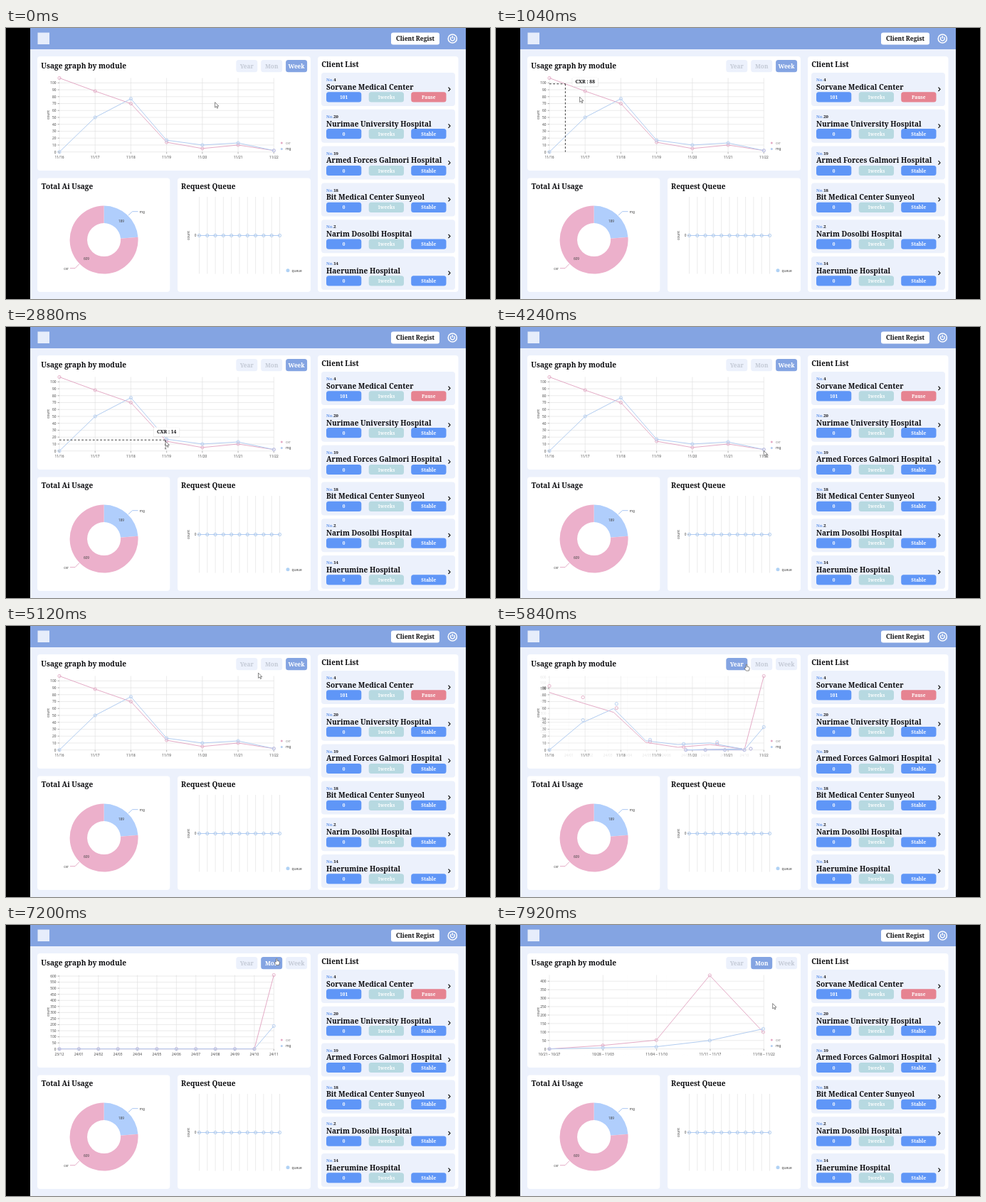
An HTML page that plays this animation: 680 by 382 pixels, repeating every 8 s.

```html
<!DOCTYPE html>
<html lang="en">
<head>
<meta charset="utf-8">
<title>Usage dashboard</title>
<style>
  html, body { margin: 0; width: 100%; height: 100%; overflow: hidden; background: #000; }
  svg { display: block; width: 680px; height: 382px; }
  text { font: 4.8px "Noto Sans", "Open Sans", sans-serif; fill: #444; }
  .b { font-family: "Noto Serif", serif; font-weight: 700; fill: #0c0c0f; }
  .m { text-anchor: middle; }
  .e { text-anchor: end; }
</style>
</head>
<body>
<svg id="stage" viewBox="0 0 680 382" xmlns="http://www.w3.org/2000/svg">
  <g id="page"></g>
  <g id="buttons"></g>
  <g id="chart"></g>
  <g id="pointer"></g>
</svg>
<script>
const LOOP = 8000;
const BLUE = '#84a4e2', PALE = '#ecf1fc';
const SERIES = { cxr: '#e4abc6', mg: '#b1ccf0' };
const PLOT = { x0: 75, x1: 376.3, y0: 70.5, y1: 174.7 };
const $ = id => document.getElementById(id);

// ---- markup helpers
const rect = (x, y, w, h, fill, r = 0, extra = '') =>
  `<rect x="${x}" y="${y}" width="${w}" height="${h}" rx="${r}" fill="${fill}" ${extra}/>`;
const line = (x1, y1, x2, y2, color, w = 0.6, extra = '') =>
  `<path d="M${x1} ${y1}L${x2} ${y2}" fill="none" stroke="${color}" stroke-width="${w}" ${extra}/>`;
const path = (d, color, w, extra = '') =>
  `<path d="${d}" fill="none" stroke="${color}" stroke-width="${w}" ${extra}/>`;
const ring = (x, y, color) =>
  `<circle cx="${x}" cy="${y}" r="2.1" fill="none" stroke="${color}" stroke-width=".9"/>`;
const dot = (x, y, r, color) => `<circle cx="${x}" cy="${y}" r="${r}" fill="${color}"/>`;
const label = (x, y, s, cls = '', extra = '') => `<text x="${x}" y="${y}" class="${cls}" ${extra}>${s}</text>`;
const bold = (x, y, s, size, fill = '#0c0c0f', cls = '') =>
  label(x, y, s, 'b ' + cls, `style="font-size:${size}px;fill:${fill}"`);
const upright = (x, y, s) => label(x, y, s, 'm', `transform="rotate(-90 ${x} ${y})"`);

// ---- static page
const CLIENTS = [
  [4, 'Sorvane Medical Center', 101, 'Pause'],
  [20, 'Nurimae University Hospital', 0, 'Stable'],
  [19, 'Armed Forces Galmori Hospital', 0, 'Stable'],
  [18, 'Bit Medical Center Sunyeol', 0, 'Stable'],
  [2, 'Narim Dosolbi Hospital', 0, 'Stable'],
  [14, 'Haerumine Hospital', 0, 'Stable']
];

function clientCard([no, name, count, state], i) {
  const y = 63 + 51.8 * i;
  const pill = (x, s, fill) =>
    rect(x, y + 27.3, 49.3, 14.2, fill, 3.5) + bold(x + 24.6, y + 36.9, s, 6.6, '#fff', 'm');
  return rect(443, y, 188, 47, PALE, 4) +
    `<text x="450" y="${y + 12.2}" class="b" style="font-size:6px"><tspan fill="#5f93ea">No.</tspan>${no}</text>` +
    bold(450, y + 23.7, name, 10.15) +
    pill(450, count, '#5f96f7') + pill(509.7, '1weeks', '#b7d9e1') +
    pill(569.2, state, state === 'Pause' ? '#e68391' : '#5f96f7') +
    path(`M621.5 ${y + 20.6}l2.5 2.7l-2.5 2.7`, '#111', 1.2);
}

function donut(cx, cy) {
  const end = 189 / 798 * 2 * Math.PI;
  const at = (r, a) => `${cx + r * Math.sin(a)} ${cy - r * Math.cos(a)}`;
  const slice = (a, b, fill) => {
    const big = b - a > Math.PI ? 1 : 0;
    return `<path fill="${fill}" d="M${at(48, a)}A48 48 0 ${big} 1 ${at(48, b)}` +
      `L${at(23.5, b)}A23.5 23.5 0 ${big} 0 ${at(23.5, a)}Z"/>`;
  };
  return slice(0, end, '#b0cefc') + slice(end, 2 * Math.PI, '#ecb0cb') +
    label(162, 274.2, 189, 'm') + label(113, 327, 609, 'm') +
    path('M172 264L177.5 258.7H185.5', '#a9c6f2', 1) + label(187.5, 260.7, 'mg') +
    path('M103 332.5L97 338.7H90', '#e4abc6', 1) + label(88, 340.7, 'cxr', 'e');
}

function queueChart() {
  const xs = Array.from({ length: 11 }, (_, i) => 271.5 + i * 11.3);
  return xs.map(x => line(x, 238, x, 346.5, '#ddd')).join('') +
    line(269, 292.5, 271.5, 292.5, '#777') +
    line(271.5, 292.5, 384.5, 292.5, '#b1ccf3', 1.1) +
    xs.map(x => ring(x, 292.5, '#a9c8ee')).join('') +
    label(267.5, 294.2, 0, 'e') + upright(257.5, 292.5, 'count') +
    dot(396, 341.7, 2.5, '#b0d2f5') + label(401.5, 343.6, 'queue');
}

$('page').innerHTML =
  rect(34, 0, 612, 382, PALE) + rect(34, 0, 612, 30, BLUE) +
  rect(44.5, 6.5, 16.5, 16.5, '#e6edfb') +
  rect(541, 6.5, 68, 17, '#fff', 3) + bold(575, 18.1, 'Client Regist', 8.5, '#0c0c0f', 'm') +
  `<circle cx="627.3" cy="15" r="6.1" fill="none" stroke="#fff" stroke-width="1.5"/>` +
  path('M625.4 12.9a2.9 2.9 0 1 0 3.8 0M627.3 11v3.8', '#fff', 1.4) +
  rect(44, 40, 384, 161, '#fff', 4) + rect(44, 211.5, 186.3, 160.5, '#fff', 4) +
  rect(241, 211.5, 187, 160.5, '#fff', 4) + rect(438, 40, 197.5, 332, '#fff', 4) +
  bold(49.3, 57.4, 'Usage graph by module', 10.2) + bold(49.8, 227.4, 'Total Ai Usage', 10.1) +
  bold(246, 227.2, 'Request Queue', 10.1) + bold(443.3, 55.4, 'Client List', 10.1) +
  CLIENTS.map(clientCard).join('') + donut(137.6, 298.6) + queueChart() +
  upright(60.5, 122.5, 'count') +
  dot(387.3, 162, 1.5, SERIES.cxr) + label(393, 163.9, 'cxr', '', 'style="fill:#888"') +
  dot(387.3, 170.5, 1.5, SERIES.mg) + label(393, 172.4, 'mg');

// ---- usage chart
const zeros = Array(11).fill(0);
const VIEWS = {
  Week: {
    max: 107, step: 10,
    names: [16, 17, 18, 19, 20, 21, 22].map(d => '11/' + d),
    cxr: [107, 88, 70, 14, 5, 10, 2], mg: [0, 50, 77, 17, 10, 13, 2]
  },
  Year: {
    max: 609, step: 50,
    names: ['23/12', ...zeros.map((_, i) => '24/' + String(i + 1).padStart(2, '0'))],
    cxr: [...zeros, 609], mg: [...zeros, 189]
  },
  Mon: {
    max: 436, step: 50,
    names: ['10/21 ~ 10/27', '10/28 ~ 11/03', '11/04 ~ 11/10', '11/11 ~ 11/17', '11/18 ~ 11/22'],
    cxr: [0, 21, 52, 436, 100], mg: [0, 7, 13, 50, 119]
  }
};

for (const v of Object.values(VIEWS)) {
  const px = i => PLOT.x0 + (PLOT.x1 - PLOT.x0) * i / (v.names.length - 1);
  const py = n => PLOT.y1 - (PLOT.y1 - PLOT.y0) * n / v.max;
  v.xTicks = new Map(v.names.map((s, i) => [s, px(i)]));
  v.yTicks = new Map();
  for (let n = 0; n <= v.max; n += v.step) v.yTicks.set(n, py(n));
  v.pts = {};
  for (const s in SERIES) v.pts[s] = v[s].map((n, i) => [px(i), py(n)]);
}

// button click, start of the path spring, start of the spring for everything else
const SWITCHES = [
  { name: 'Week', click: -9e3, lines: -9e3, rest: -9e3 },
  { name: 'Year', click: 5750, lines: 5768, rest: 5787 },
  { name: 'Mon', click: 7190, lines: 7205, rest: 7222 }
];

const lerp = (a, b, p) => a + (b - a) * p;
const clamp = p => Math.max(0, Math.min(1, p));

// Underdamped spring: tension 120, friction 14
function spring(ms) {
  if (ms <= 0) return 0;
  const t = ms / 1000, w = Math.sqrt(71);
  return 1 - Math.exp(-7 * t) * (Math.cos(w * t) + 7 / w * Math.sin(w * t));
}

// Shared ticks slide, the others fade in or out in place
function blendTicks(from, to, p, draw) {
  let out = '';
  for (const [key, pos] of to)
    out += from.has(key) ? draw(key, lerp(from.get(key), pos, p), 1) : draw(key, pos, clamp(p));
  if (p < 0.999)
    for (const [key, pos] of from) if (!to.has(key)) out += draw(key, pos, clamp(1 - p));
  return out;
}

const blendPoints = (from, to, p) =>
  to.map(([x, y], i) => from[i] ? [lerp(from[i][0], x, p), lerp(from[i][1], y, p)] : [x, y]);

// Hovered point of the cxr series over time; -1 hides the tooltip
const HOVERS = [[640, 0], [925, 1], [1740, 2], [2630, 3], [3200, 4], [3600, 5], [3860, 6], [4120, -1]];

function hover(t) {
  const k = HOVERS.findLastIndex(h => h[0] <= t);
  if (k < 0 || HOVERS[k][1] < 0) return '';
  const { pts, cxr } = VIEWS.Week, i = HOVERS[k][1];
  const to = pts.cxr[i], from = k ? pts.cxr[HOVERS[k - 1][1]] : to;
  const p = spring(t - HOVERS[k][0]);
  const x = lerp(from[0], to[0], p), y = lerp(from[1], to[1], p);
  const dash = 'stroke-dasharray="2.8 2.4" stroke-opacity=".85"';
  return line(x, y, x, PLOT.y1, '#000', 0.9, dash) + line(PLOT.x0, y, x, y, '#000', 0.9, dash) +
    rect(to[0] - 18.5, to[1] - 19.2, 37, 13.4, '#000', 1.5, 'fill-opacity=".12"') +
    rect(to[0] - 18, to[1] - 19.5, 36, 13, '#fff', 1) +
    bold(to[0], to[1] - 10.6, 'CXR : ' + cxr[i], 6.8, '#0c0c0f', 'm');
}

function chart(t) {
  const at = key => {
    const k = SWITCHES.findLastIndex(s => s[key] <= t);
    return [VIEWS[SWITCHES[Math.max(0, k - 1)].name], VIEWS[SWITCHES[k].name], spring(t - SWITCHES[k][key])];
  };
  const [a, b, p] = at('rest'), [la, lb, lp] = at('lines');
  const { x0, x1, y0, y1 } = PLOT;
  let out = blendTicks(a.xTicks, b.xTicks, p, (s, x, o) => `<g opacity="${o}">` +
    line(x, y0, x, y1, '#ddd') + line(x, y1, x, y1 + 2.5, '#777') + label(x, 184.4, s, 'm') + '</g>');
  out += blendTicks(a.yTicks, b.yTicks, p, (n, y, o) => `<g opacity="${o}">` +
    line(x0, y, x1, y, '#ddd') + line(x0 - 2.5, y, x0, y, '#777') + label(x0 - 4.4, y + 1.9, n, 'e') + '</g>');
  for (const s in SERIES)
    out += path('M' + blendPoints(la.pts[s], lb.pts[s], lp).join('L'), SERIES[s], 1);
  for (const s in SERIES)
    out += blendPoints(a.pts[s], b.pts[s], p).map(([x, y]) => ring(x, y, SERIES[s])).join('');
  return out + hover(t);
}

function buttons(t) {
  const active = SWITCHES.findLast(s => s.click <= t).name;
  return ['Year', 'Mon', 'Week'].map((s, i) => {
    const x = 323.3 + 34.9 * i, on = s === active;
    return rect(x, 45, 30, 17.3, on ? BLUE : PALE, 3.5) +
      bold(x + 15, 56.8, s, 8.3, on ? '#fff' : '#c4cad6', 'm');
  }).join('');
}

// ---- pointer: time, x, y
const TRACK = [
  [0, 293.6, 104.7], [80, 293.6, 104.7], [640, 84, 74], [820, 80, 73], [1040, 117.6, 97.2],
  [1280, 126, 91], [1600, 127, 91], [1800, 175, 106], [2400, 177, 108], [2700, 224, 161],
  [3080, 224.3, 161], [3280, 276, 169], [3500, 276, 170], [3640, 326, 165], [3780, 326, 166],
  [3920, 376, 172], [4240, 376.3, 174.3], [4480, 376.3, 174.3], [5280, 352, 53.7],
  [6400, 352, 53.7], [6960, 380.3, 47], [7240, 380.3, 47], [7840, 388.7, 110.6], [8000, 388.7, 110.6]
];

function pointer(t) {
  const k = Math.max(1, TRACK.findIndex(s => s[0] > t));
  const [t0, xa, ya] = TRACK[k - 1], [t1, xb, yb] = TRACK[k];
  const u = (t - t0) / (t1 - t0), p = u * u * (3 - 2 * u);
  const x = lerp(xa, xb, p), y = lerp(ya, yb, p);
  const hand = y > 43 && y < 62.3 && x > 323 && x < 423.5;
  const d = hand
    ? 'M-.8 5V.8Q0-.2.8.8V3.4L3.4 4.2Q4.4 4.6 4.2 6L3.4 9.4H-.6L-3 6.2Q-3 4.8-1.8 5.4Z'
    : 'M0 0V7.4L1.8 5.8L3 8.5L4.2 8L3 5.4H5.3Z';
  return `<path d="${d}" transform="translate(${x} ${y})" fill="#fff" stroke="#555" stroke-width=".7" stroke-linejoin="round"/>`;
}

function render(t) {
  $('buttons').innerHTML = buttons(t);
  $('chart').innerHTML = chart(t);
  $('pointer').innerHTML = pointer(t);
}

const start = performance.now();
function tick(now) {
  render(Math.max(0, now - start) % LOOP);
  requestAnimationFrame(tick);
}
render(0);
requestAnimationFrame(tick);
</script>
</body>
</html>
```
